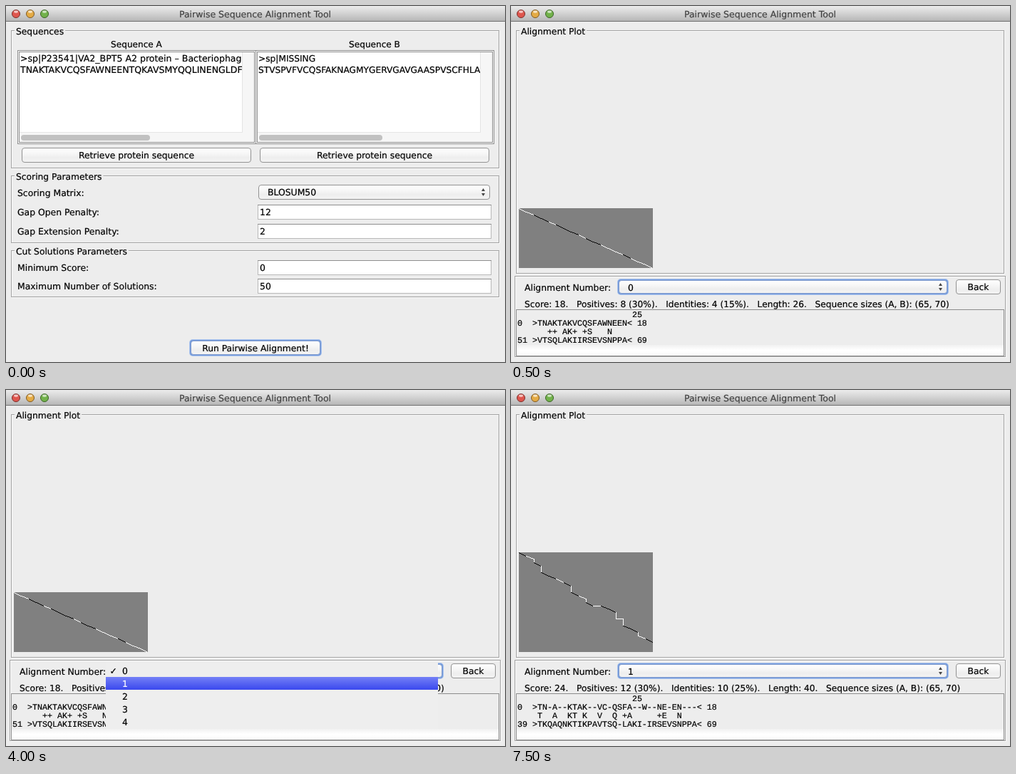
An HTML page with a canvas that plays this animation: 700 by 500 pixels, repeating every 8 s.

```html
<!DOCTYPE html>
<html lang="en">
<head>
<meta charset="utf-8">
<title>Pairwise Sequence Alignment Tool</title>
<style>
html, body { margin: 0; width: 100%; height: 100%; overflow: hidden; background: #ededed; }
canvas { display: block; width: 700px; height: 500px; }
</style>
</head>
<body>
<canvas id="stage" width="700" height="500"></canvas>
<script>
const ctx = document.getElementById('stage').getContext('2d');
const LOOP = 8000;
const BG = '#ededed', INK = '#000', EDGE = '#a2a2a2';
const UI = '"DejaVu Sans", sans-serif';
const MONO = '"Liberation Mono", monospace';

const alignments = [
  {
    info: 'Score: 18.   Positives: 8 (30%).   Identities: 4 (15%).   Length: 26.   Sequence sizes (A, B): (65, 70)',
    a: 'TNAKTAKVCQSFAWNEEN',
    mid: '  ++ AK+ +S   N',
    b: 'VTSQLAKIIRSEVSNPPA',
    start: 51, top: 284
  },
  {
    info: 'Score: 24.   Positives: 12 (30%).   Identities: 10 (25%).   Length: 40.   Sequence sizes (A, B): (65, 70)',
    a: 'TN-A--KTAK--VC-QSFA--W--NE-EN---',
    mid: 'T  A  KT K  V  Q +A     +E  N',
    b: 'TKQAQNKTIKPAVTSQ-LAKI-IRSEVSNPPA',
    start: 39, top: 228
  }
];

function rect(x, y, w, h, color) {
  ctx.fillStyle = color;
  ctx.fillRect(x, y, w, h);
}

function frame(x, y, w, h, color) {
  ctx.strokeStyle = color;
  ctx.lineWidth = 1;
  ctx.strokeRect(x + .5, y + .5, w - 1, h - 1);
}

// A hairline stroke gives the slightly heavy desktop look.
function text(str, x, y, size = 12.4, { align = 'left', color = INK, family = UI } = {}) {
  ctx.font = `${size}px ${family}`;
  ctx.textAlign = align;
  ctx.fillStyle = ctx.strokeStyle = color;
  ctx.lineWidth = .2;
  ctx.fillText(str, x, y);
  ctx.strokeText(str, x, y);
}

function gradient(y0, y1, ...colors) {
  const g = ctx.createLinearGradient(0, y0, 0, y1);
  colors.forEach((c, i) => g.addColorStop(i / (colors.length - 1), c));
  return g;
}

function rounded(x, y, w, h, r, fill) {
  ctx.beginPath();
  ctx.roundRect(x, y, w, h, r);
  ctx.fillStyle = fill;
  ctx.fill();
}

function etched(x, y, w, h) {
  frame(x + 1, y + 1, w, h, '#fafafa');
  frame(x, y, w, h, EDGE);
}

function group(title, x, y, w, h) {
  etched(x, y, w, h);
  ctx.font = `12.3px ${UI}`;
  rect(x + 5, y - 1, ctx.measureText(title).width + 4, 4, BG);
  text(title, x + 7, y + 6, 12.3);
}

function control(x, y, w, h, focused) {
  if (focused) {
    rounded(x - 2, y - 2, w + 4, h + 4, 5, '#aac4ee');
    rounded(x - 1, y - 1, w + 2, h + 2, 4, '#7399da');
  }
  rounded(x + .5, y + .5, w - 1, h - 1, 3.5,
    gradient(y, y + h, '#ffffff', '#f8f8f8', '#eeeeee', '#f4f4f4'));
  ctx.strokeStyle = focused ? '#86a0d0' : '#929292';
  ctx.lineWidth = 1;
  ctx.stroke();
}

function button(label, x, y, w, h, focused) {
  control(x, y, w, h, focused);
  text(label, x + w / 2, y + 15, 12.3, { align: 'center' });
}

function combo(value, x, y, w, h, focused) {
  control(x, y, w, h, focused);
  text(value, x + 13, y + 14.5);
  const cx = x + w - 9.5, cy = y + h / 2;
  ctx.fillStyle = '#444';
  for (const dir of [-1, 1]) {
    ctx.beginPath();
    ctx.moveTo(cx - 2.5, cy + 1.5 * dir);
    ctx.lineTo(cx + 2.5, cy + 1.5 * dir);
    ctx.lineTo(cx, cy + 5.5 * dir);
    ctx.fill();
  }
}

function field(label, value, y) {
  text(label, 16, y + 15);
  rect(353, y, 328, 21, '#fff');
  frame(353, y, 328, 21, '#b8b8b8');
  rect(353, y, 328, 1, '#8e8e8e');
  text(value, 356, y + 15);
}

function titleBar() {
  rect(0, 0, 700, 21, gradient(0, 21, '#ececec', '#d2d2d2', '#b6b6b6'));
  rect(0, 21, 700, 1, '#717171');
  text('Pairwise Sequence Alignment Tool', 349.5, 16, 12.5, { align: 'center', color: '#424242' });
  const lights = [['#df564e', '#7c302c'], ['#e4ab45', '#7f5a24'], ['#72b24b', '#3c6428']];
  lights.forEach(([fill, edge], i) => {
    const x = 14 + 20 * i;
    ctx.beginPath();
    ctx.arc(x, 11, 5.5, 0, 7);
    ctx.fillStyle = fill;
    ctx.fill();
    ctx.strokeStyle = edge;
    ctx.lineWidth = 1;
    ctx.stroke();
    ctx.beginPath();
    ctx.ellipse(x, 8, 3, 1.8, 0, 0, 7);
    ctx.fillStyle = 'rgba(255,255,255,.65)';
    ctx.fill();
  });
}

function sequencePane(title, x, lines, size, thumb) {
  text(title, x + 168, 58, 12.1, { align: 'center' });
  rect(x + 1, 62, 335, 132, '#fff');
  frame(x + 1, 62, 335, 132, '#8c8c8c');
  frame(x + 3, 64, 331, 128, '#8c8c8c');
  rect(x + 316, 65, 17, 126, '#f6f6f6');
  rect(x + 316, 65, 1, 113, '#e4e4e4');
  rect(x + 4, 178, 329, 13, '#f6f6f6');
  rect(x + 4, 177, 313, 1, '#e6e6e6');
  rounded(x + 6, 181, thumb, 8, 4, '#c1c1c1');
  ctx.save();
  ctx.beginPath();
  ctx.rect(x + 4, 65, 312, 112);
  ctx.clip();
  lines.forEach((line, i) => text(line, x + 5, 78 + 16 * i, size));
  ctx.restore();
  button('Retrieve protein sequence', x + 7, 199, 322, 21);
}

function inputScreen() {
  group('Sequences', 7, 34, 685, 194);
  sequencePane('Sequence A', 15, [
    '>sp|P23541|VA2_BPT5 A2 protein – Bacteriophag',
    'TNAKTAKVCQSFAWNEENTQKAVSMYQQLINENGLDF'
  ], 12.55, 181);
  sequencePane('Sequence B', 349, [
    '>sp|MISSING',
    'STVSPVFVCQSFAKNAGMYGERVGAVGAASPVSCFHLA'
  ], 12.2, 173);

  group('Scoring Parameters', 7, 238, 685, 95);
  text('Scoring Matrix:', 16, 267);
  combo('BLOSUM50', 354, 251, 325, 21);
  field('Gap Open Penalty:', '12', 279);
  field('Gap Extension Penalty:', '2', 306);

  group('Cut Solutions Parameters', 7, 343, 685, 66);
  field('Minimum Score:', '0', 357);
  field('Maximum Number of Solutions:', '50', 383);

  button('Run Pairwise Alignment!', 259, 470, 182, 20, true);
}

function pixelLine(x0, y0, x1, y1, color) {
  const n = Math.max(Math.abs(x1 - x0), Math.abs(y1 - y0));
  for (let i = 0; i <= n; i++) {
    const k = n ? i / n : 0;
    rect(Math.round(x0 + (x1 - x0) * k), Math.round(y0 + (y1 - y0) * k), 1, 1, color);
  }
}

// Each residue advances one step; a gap leaves that axis where it is.
function plot({ a, b, mid, top }) {
  const px = n => Math.round(11 + n * 188 / 18);
  const py = n => Math.round(top + n * 14 / 3);
  ctx.save();
  ctx.beginPath();
  ctx.rect(11, top, 188, 368 - top);
  ctx.clip();
  rect(11, top, 188, 368 - top, '#808080');
  let x = 0, y = 0;
  for (let i = 0; i < a.length; i++) {
    const nx = x + (a[i] !== '-'), ny = y + (b[i] !== '-');
    const hit = (mid[i] || ' ') !== ' ';
    pixelLine(px(x), py(y), px(nx), py(ny), hit ? '#000' : '#fff');
    x = nx;
    y = ny;
  }
  ctx.restore();
}

function resultScreen(index) {
  const data = alignments[index];
  group('Alignment Plot', 7, 34, 685, 342);
  plot(data);

  etched(5, 379, 689, 114);
  text('Alignment Number:', 19, 400);
  combo(String(index), 151, 385, 461, 19, true);
  button('Back', 624, 384, 63, 21);
  text(data.info, 19, 423, 12.2);

  rect(8, 476, 683, 15, gradient(476, 491, '#f1f1f1', '#ffffff', '#fafafa'));
  frame(7, 426, 685, 66, '#8c8c8c');
  const rows = [
    ' '.repeat(23) + '25',
    `0  >${data.a}< 18`,
    '    ' + data.mid,
    `${data.start} >${data.b}< 69`
  ];
  rows.forEach((row, i) => text(row, 9, 437 + 12 * i, 11.667, { family: MONO }));
}

function menu() {
  rect(140, 382, 466, 94, '#eeeeee');
  rect(140, 403, 466, 18, gradient(403, 421, '#7480f6', '#3a48ee'));
  text('✓', 145.5, 399);
  for (let i = 0; i < 5; i++) {
    text(String(i), 163, 399 + 18 * i, 12.4, { color: i === 1 ? '#fff' : INK });
  }
}

function draw(t) {
  rect(0, 0, 700, 500, BG);
  titleBar();
  if (t < 500) {
    inputScreen();
  } else {
    resultScreen(t < 7500 ? 0 : 1);
    if (t >= 4000 && t < 7500) menu();
  }
}

ctx.textRendering = 'geometricPrecision';
const begin = performance.now();
function tick() {
  draw((performance.now() - begin) % LOOP);
  requestAnimationFrame(tick);
}
tick();
</script>
</body>
</html>
```
